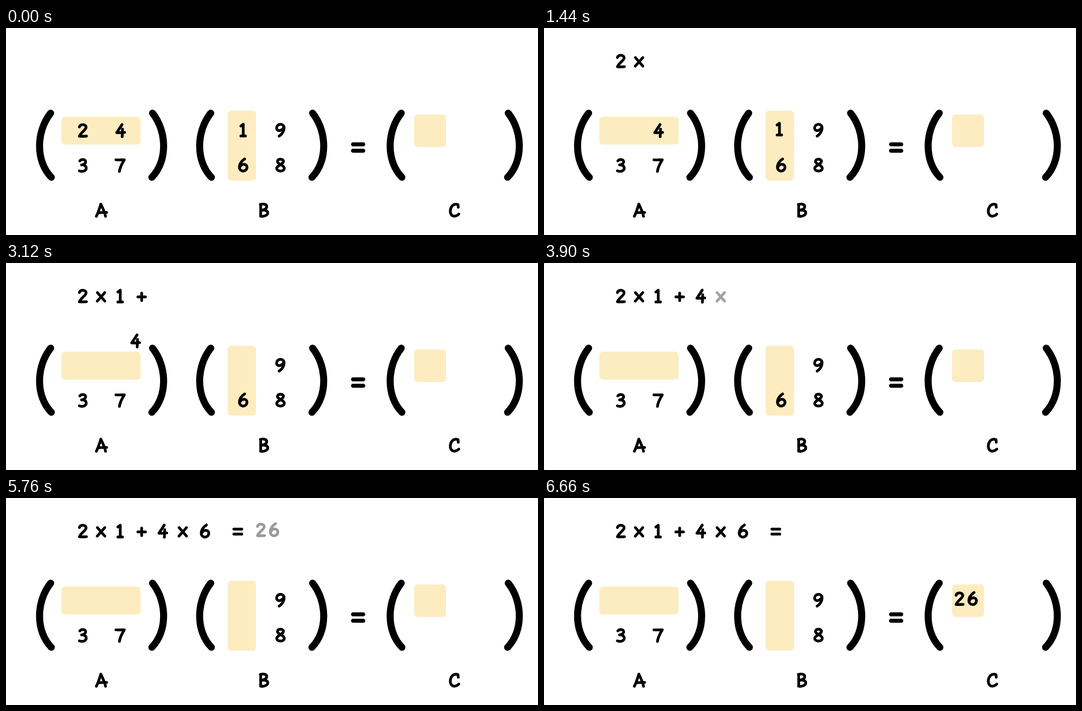
Animation of 1198 by 468 pixels, one loop 6690 ms. Source, as an HTML page:

```html
<!DOCTYPE html>
<html lang="en">
<head>
<meta charset="utf-8">
<title>Matrix multiplication</title>
<style>
  html, body { margin: 0; width: 100%; height: 100%; overflow: hidden; background: #777; }
  svg { display: block; width: 100vw; height: 100vh; }
  .ink { fill: none; stroke: #000; stroke-width: 6.4; stroke-linecap: round; stroke-linejoin: round; }
  .paren { stroke-width: 15.8; }
  .equals { stroke-width: 9; }
</style>
</head>
<body>
<svg id="stage" viewBox="0 0 1198 468" role="img" aria-label="Matrix A times matrix B equals matrix C">
  <rect width="1198" height="468" rx="2" fill="#fff"/>
  <g fill="#fcecc0">
    <rect x="124.5" y="200.5" width="178.5" height="63" rx="8"/>
    <rect x="499" y="187" width="64" height="158" rx="8"/>
    <rect x="919" y="195.5" width="72" height="73.5" rx="8"/>
  </g>
  <g id="ink" class="ink"></g>
</svg>
<script>
const LOOP = 6690, STEP = 30, MOVE = 880, FADE = 360;

// Handwritten characters as pen strokes around their centre.
const STROKES = {
  1: 'M-5.3,-9.8 L.3,-14 V13.7 M-5.3,13.7 H5.5',
  2: 'M-8,-8.5 C-7,-12.5 -3.5,-14 0,-14 C5,-14 8,-11 7.5,-7 C6.8,-1.5 -5,5 -8,13.2 C-3,13.8 4,13.2 8.5,13',
  3: 'M-7,-11 C-3,-15.5 7,-15.5 6.5,-8.5 C6,-4.5 1,-2.2 -3,-1.5 C4,-2 8,1 8,6 C8,12.5 -1,15.5 -8,12.5',
  4: 'M3.5,-14.3 L-9,4.8 C-4,5.2 4,4.6 9.3,4.2 M4.6,-3.5 L3.8,14.3',
  6: 'M3.5,-14.5 C-4,-10 -9,-2 -8.7,5 C-8.3,11 -4,14 0,14 C5,14 9,10 9,5 C9,1 6,-2 2,-2 C-3,-2 -7,2 -8.3,6',
  7: 'M-9.8,-13.5 C-3,-13 4,-13.5 9.8,-13.5 C4.5,-5 -.5,4 -1.6,13.7',
  8: 'M7,-10 C4,-15.5 -7,-15.5 -7,-8.5 C-7,-2 9,0 9,7.5 C9,16 -8.7,16 -8.7,7.5 C-8.7,1 8,-2 7,-10',
  9: 'M8.3,-8 C6.5,-12.5 2.5,-14.2 -1,-13.7 C-6,-13 -9,-9 -9,-5 C-9,-1 -6,1.2 -3,1.2 C3,1 7,-4 8.3,-8 C9.5,0 5,9 -3,14',
  A: 'M-12,14.2 C-8,6 -4,-6 -1.5,-14.5 C3,-5 8,5 9.5,14.2 M-7.5,6 C-2,5.4 6,5.2 12,5.2',
  B: 'M-7.8,-13.5 V14 M-8.5,-13.5 C1,-16.5 7,-13 6.3,-7.5 C5.5,-3 0,-1 -5,0 C2,-1 8.8,1 8.8,6 C8.8,12 0,15.5 -8,14',
  C: 'M8.8,-7 L8.2,-13 C3,-15.8 -3,-13.5 -6.5,-9 C-11,-2 -11,6 -7,11 C-3,16 6,14 10,9',
  '×': 'M-8.5,-10 L8.8,10 M8.7,-10 L-8.8,10.2',
  '+': 'M-8.9,.2 H8.9 M0,-8.8 V8.8',
  '=': 'M-9.3,-5.9 H9.3 M-9.3,5.9 H9.3'
};

const ink = document.getElementById('ink');

function add(tag, attrs, parent = ink) {
  const node = document.createElementNS('http://www.w3.org/2000/svg', tag);
  for (const key in attrs) node.setAttribute(key, attrs[key]);
  return parent.appendChild(node);
}

const place = (node, x, y) => node.setAttribute('transform', `translate(${x} ${y})`);

function glyph(char, x, y, parent) {
  const node = add('g', { 'aria-label': char }, parent);
  add('path', { d: STROKES[char], transform: 'scale(.96)' }, node);
  place(node, x, y);
  return node;
}

// Parentheses of the three matrices.
for (const [left, right] of [[0, 0], [360.5, 360.5], [789.5, 801]]) {
  add('path', { class: 'paren', d: 'M100.5,192.5 C67,235 67,302 102,337.5', transform: `translate(${left})` });
  add('path', { class: 'paren', d: 'M330,192.5 C363.5,235 363.5,302 328.5,337.5', transform: `translate(${right})` });
}
add('path', { class: 'equals', d: 'M781.5,263 H804.5 M781.5,277.5 H804.5' });

glyph('3', 173, 311);
glyph('7', 257, 311);
glyph('9', 618, 231);
glyph('8', 618, 310);
glyph('A', 215, 412);
glyph('B', 581, 412);
glyph('C', 1010, 412);

const result = add('g', { 'aria-label': '26' });
glyph('2', 574, 72.5, result);
glyph('6', 603.5, 72, result);

const movers = [
  { node: glyph('2', 0, 0), from: [173, 232], to: [173, 75], start: -10 },
  { node: glyph('1', 0, 0), from: [534, 231], to: [257, 75], start: 1372 },
  { node: glyph('4', 0, 0), from: [258, 232], to: [353, 75], start: 2762 },
  { node: glyph('6', 0, 0), from: [534, 310], to: [448, 75], start: 4136 },
  { node: result, from: [0, 0], to: [365, 157], start: 5970, time: 735 }
];

const faders = [
  { node: glyph('×', 214, 76.5), start: 1025 },
  { node: glyph('+', 305.5, 76.5), start: 2390 },
  { node: glyph('×', 398, 76.5), start: 3772 },
  { node: glyph('=', 522, 76), start: 5249, time: 1 },
  { node: result, start: 5620 }
];

const clamp = v => Math.min(1, Math.max(0, v));
const ease = p => (1 - Math.cos(Math.PI * p)) / 2;
const mix = (a, b, k) => a + (b - a) * k;

function draw(t) {
  for (const { node, from, to, start, time = MOVE } of movers) {
    const k = ease(clamp((t - start) / time));
    place(node, mix(from[0], to[0], k), mix(from[1], to[1], k));
  }
  for (const { node, start, time = FADE } of faders) {
    node.setAttribute('opacity', clamp((t - start) / time));
  }
}

const origin = performance.now();
function tick() {
  const t = (performance.now() - origin) % LOOP;
  draw(Math.floor(t / STEP) * STEP);
  requestAnimationFrame(tick);
}
draw(0);
requestAnimationFrame(tick);
</script>
</body>
</html>
```
